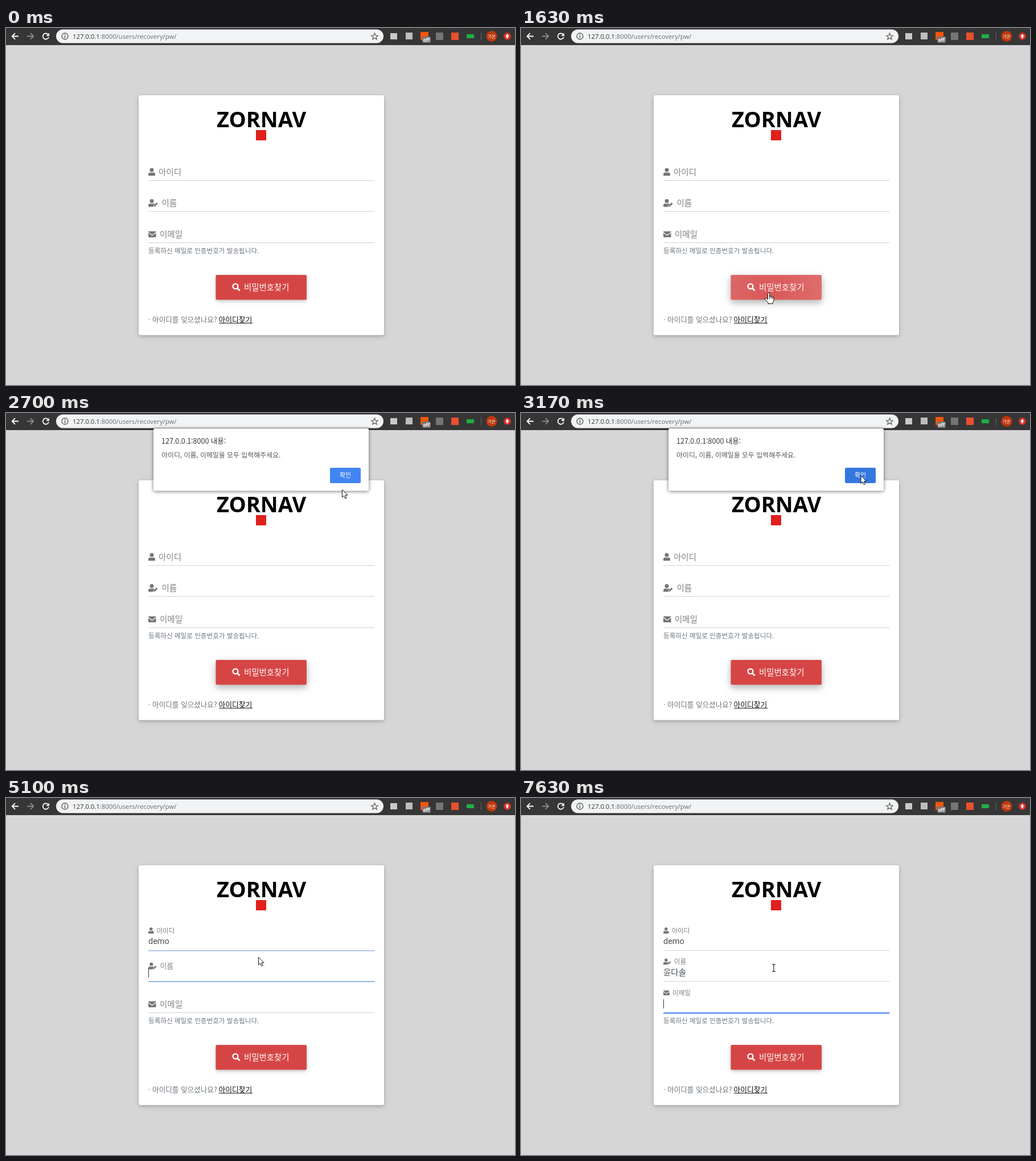
An HTML page that plays this animation: 894x626 px, repeating every 8 s.

```html
<!DOCTYPE html>
<html lang="ko">
<head>
<meta charset="utf-8">
<style>
  html, body { margin: 0; width: 100%; height: 100%; overflow: hidden; background: #d6d6d6; }
  svg { display: block; width: 894px; height: 626px; }
  text { font-family: "Noto Sans CJK KR", "Noto Sans CJK", "Noto Sans", sans-serif; white-space: pre; }
  .shadow { filter: drop-shadow(0 2px 2.5px rgba(0,0,0,.16)) drop-shadow(0 2px 5px rgba(0,0,0,.12)); }
  .latin { font-family: Roboto, "Noto Sans CJK KR", sans-serif; }
  .url { font-family: "Open Sans", "Noto Sans", sans-serif; }
  .word { font-family: "Noto Sans", "Open Sans", sans-serif; font-weight: 900; }
  .label text { font-size: 14.5px; font-weight: 300; fill: #808080; }
  .label { fill: #757575; }
  .value { fill: #495057; }
</style>
</head>
<body>
<svg viewBox="0 0 894 626">
  <defs>
    <clipPath id="btnClip"><rect x="368.5" y="433" width="159.5" height="43.5" rx="2"/></clipPath>
    <radialGradient id="wave">
      <stop offset="0" stop-color="#fff" stop-opacity=".1"/>
      <stop offset=".5" stop-color="#fff" stop-opacity=".19"/>
      <stop offset=".75" stop-color="#fff" stop-opacity=".25"/>
      <stop offset="1" stop-color="#fff" stop-opacity="0"/>
    </radialGradient>
    <path id="user" d="M6 0a3.4 3.4 0 0 1 0 6.9a3.4 3.4 0 0 1 0-6.9M3.4 7.7Q6 9 8.6 7.7Q12 8 12 11.2V12.6Q12 13.5 11 13.5H1Q0 13.5 0 12.6V11.2Q0 8 3.4 7.7Z"/>
  </defs>

  <rect width="894" height="626" fill="#d6d6d6"/>

  <!-- browser bar -->
  <rect width="894" height="30" fill="#363636"/>
  <g fill="none" stroke-width="1.8">
    <path d="M22 14.5H11M16 9.2L10.7 14.5L16 19.8" stroke="#fff"/>
    <path d="M37 14.5H48M43 9.2L48.3 14.5L43 19.8" stroke="#8b8b8b"/>
    <path d="M74 11.2A5.2 5.2 0 1 0 75 15.8" stroke="#fff"/>
  </g>
  <path d="M76 8.4V14H70.4Z" fill="#fff"/>
  <rect x="88" y="2.5" width="575" height="24" rx="12" fill="#f1f3f4"/>
  <circle cx="103.5" cy="14.5" r="5.5" fill="none" stroke="#555" stroke-width="1.3"/>
  <path d="M103.5 11V12.4M103.5 13.6V18" stroke="#555" stroke-width="1.4"/>
  <text x="117" y="18.5" font-size="11.3" class="url" fill="#333">127.0.0.1<tspan fill="#6a6d70">:8000/users/recovery/pw/</tspan></text>
  <path d="M647.5 9L649 13L653.3 13.2L650 15.9L651.1 20L647.5 17.7L643.9 20L645 15.9L641.7 13.2L646 13Z" fill="none" stroke="#555" stroke-width="1.2"/>
  <rect x="675" y="9" width="12" height="11" fill="#c9c9c9"/>
  <rect x="702" y="8" width="12" height="12" fill="#bdbdbd"/>
  <rect x="728" y="7" width="14" height="14" fill="#f4560c"/>
  <rect x="731" y="15" width="15" height="11" rx="2" fill="#777"/>
  <text x="738.5" y="24" font-size="9" font-weight="700" class="latin" text-anchor="middle" fill="#fff">off</text>
  <rect x="755" y="8" width="13" height="13" fill="#757575"/>
  <rect x="782" y="8" width="13" height="13" fill="#e9502f"/>
  <rect x="809" y="11" width="13" height="7" fill="#1fae45"/>
  <rect x="834" y="8" width="1" height="13" fill="#666"/>
  <circle cx="853" cy="14.5" r="9.5" fill="#bf360c"/>
  <text x="853" y="17.5" font-size="7.5" text-anchor="middle" fill="#fff">가온</text>
  <circle cx="880.5" cy="14.5" r="6.5" fill="#d93025"/>
  <path d="M880.5 10.5L884 14.5H882V18H879V14.5H877Z" fill="#fff"/>

  <!-- card -->
  <rect class="shadow" x="233" y="118" width="431" height="420.5" rx="3" fill="#fff"/>
  <text class="word" x="448.5" y="174" font-size="38" text-anchor="middle">ZORNAV</text>
  <rect x="439" y="179" width="18" height="18" fill="#e0201c"/>

  <g id="fields"></g>
  <text x="250" y="395" font-size="11.6" fill="#6c757d">등록하신 메일로 인증번호가 발송됩니다.</text>

  <rect id="btn" x="368.5" y="433" width="159.5" height="43.5" rx="2" fill="#d64545"/>
  <g clip-path="url(#btnClip)"><circle id="ripple" cx="435" cy="465" fill="url(#wave)"/></g>
  <g fill="none" stroke="#fff">
    <circle cx="403" cy="453" r="4.4" stroke-width="2.4"/>
    <path d="M406.5 456.5L410.5 460.5" stroke-width="2.8"/>
  </g>
  <text x="418" y="459.5" font-size="14.4" font-weight="500" fill="#fff">비밀번호찾기</text>

  <text x="250" y="515.5" font-size="12.6" fill="#6c757d">· 아이디를 잊으셨나요?</text>
  <text x="373.5" y="515.5" font-size="12.8" fill="#111">아이디찾기</text>
  <rect x="374" y="517" width="59" height="1" fill="#111"/>

  <g id="dialog">
    <rect x="259" y="27" width="378" height="109.5" rx="2" fill="#fff" style="filter:drop-shadow(0 1px 3px rgba(0,0,0,.55))"/>
    <text x="273" y="54" font-size="12.5" fill="#333">127.0.0.1:8000 내용:</text>
    <text x="273" y="78" font-size="11.9" fill="#555">아이디, 이름, 이메일을 모두 입력해주세요.</text>
    <rect id="ok" x="569" y="96" width="54" height="27" rx="2.5"/>
    <text x="596" y="113" font-size="11" text-anchor="middle" fill="#fff">확인</text>
  </g>

  <g id="cursor">
    <path id="arrow" d="M0 0V13.5L3.1 10.6L5.3 15.6L7.6 14.6L5.4 9.7H9.6Z" fill="#fff" stroke="#111"/>
    <path id="hand" d="M-1.5 9V1Q-1.5 -.5 0 -.5T1.5 1V6Q3 5 4.2 6.5Q6 5.7 7 7.2Q8.8 6.7 9 9V13Q8.5 16 7 17.5V19H-1V17Q-4 14 -6.5 10.5Q-7 8.5 -4.5 9L-1.5 11.5ZM1.5 6V10M4.2 6.5V10M7 7.2V10.5" fill="#fff" stroke="#111"/>
    <path id="beam" d="M-3 -6.5H-1L0 -5.5L1 -6.5H3M0 -5.5V5.5M-3 6.5H-1L0 5.5L1 6.5H3" fill="none" stroke="#222" stroke-width="1.2"/>
  </g>
</svg>

<script>
const $ = id => document.getElementById(id);
const LOOP = 8000;
const clamp = v => Math.max(0, Math.min(1, v));
const ease = (t, from, len) => 1 - (1 - clamp((t - from) / len)) ** 2;
const mix = (a, b, p) => a + (b - a) * p;
const blend = (a, b, p) => `rgb(${a.map((v, i) => Math.round(mix(v, b[i], p)))})`;

const GREY = [206, 209, 213], BLUE = [66, 133, 244];
const USER = '<use href="#user"/>';
const PEN = '<path d="M9 13.5L9.4 10.7L14.5 5.8L17 8.2L11.9 13.2Z" stroke="#fff" stroke-width=".8"/>';
const MAIL = '<path d="M0 3.2Q0 2 1.2 2H12.3Q13.5 2 13.5 3.2L6.75 8.3ZM0 4.7L6.75 9.7L13.5 4.7V11.3Q13.5 12.5 12.3 12.5H1.2Q0 12.5 0 11.3Z"/>';

// typed: [time, text, composing part]; carets: [on, off] spans
const fields = [
  { name: '아이디', icon: USER, textX: 18, y: 252, line: 267, focus: 3960, blur: 5010,
    typed: [[4430, 'd'], [4500, 'de'], [4570, 'dem'], [4630, 'demo']],
    carets: [[3830, 4970]] },
  { name: '이름', icon: USER + PEN, textX: 23.5, y: 306.5, line: 321, focus: 5010, blur: 6770,
    typed: [[5830, '', 'ㅇ'], [5900, '', '유'], [5970, '', '윤'], [6300, '윤', 'ㄷ'], [6370, '윤', '다'],
            [6430, '윤다', ''], [6630, '윤다', 'ㅅ'], [6700, '윤다', '소'], [6740, '윤다', '솔'], [6800, '윤다솔']],
    carets: [[4970, 5500], [5830, 6770]] },
  { name: '이메일', icon: MAIL, textX: 20, y: 361, line: 376, focus: 6770, blur: 9000,
    typed: [[7300, '', 'ㅅ'], [7630, '']],
    carets: [[6770, 7300], [7370, 8000]] }
];

for (const f of fields) {
  const g = document.createElementNS('http://www.w3.org/2000/svg', 'g');
  g.innerHTML = `<rect x="250" y="${f.line}" width="397.5" height="1"/>
    <g class="label">${f.icon}<text x="${f.textX}" y="12">${f.name}</text></g>
    <text class="value latin" x="250" y="${f.y + 4}" font-size="14.5"><tspan></tspan><tspan></tspan></text>
    <rect height="1" y="${f.y + 7}" fill="#495057"/>
    <rect width="1" height="16" y="${f.y - 8}" fill="#333"/>`;
  $('fields').append(g);
  [f.bar, f.label, f.value, f.under, f.caret] = g.children;
}

const last = (list, t) => list.filter(k => k[0] <= t).pop();

function drawField(f, t) {
  const up = ease(t, f.focus, 240);
  f.label.setAttribute('transform', `translate(250 ${f.y - 6.5 - 18.6 * up}) scale(${1 - .2 * up})`);
  const lit = ease(t, f.focus, 250) * (1 - ease(t, f.blur, 260));
  f.bar.setAttribute('fill', blend(GREY, BLUE, lit));
  f.bar.setAttribute('height', 1 + lit);

  const [, text = '', part = ''] = last(f.typed, t) || [];
  const [a, b] = f.value.children;
  a.textContent = text;
  b.textContent = part;
  const start = 250 + (text ? a.getComputedTextLength() : 0);
  const end = start + (part ? b.getComputedTextLength() : 0);
  f.under.setAttribute('x', start);
  f.under.setAttribute('width', end - start);
  f.caret.setAttribute('x', Math.round(end));
  f.caret.style.display = f.carets.some(([on, off]) => t >= on && t < off) ? '' : 'none';
}

// pointer stops: time, x, y, shape
const stops = [
  [430, 880, 640, 'arrow'], [500, 842, 612, 'arrow'], [700, 600, 560, 'arrow'], [870, 332, 520, 'arrow'],
  [1000, 370, 500, 'arrow'], [1170, 435, 464.5, 'hand'], [1830, 435, 464.5, 'arrow'],
  [2170, 526, 436, 'arrow'], [2450, 565, 270, 'arrow'], [2700, 590.5, 134.5, 'arrow'],
  [3030, 597, 110, 'arrow'], [3200, 597, 110, 'arrow'], [3630, 440, 378, 'arrow'],
  [3770, 440, 378, 'arrow'], [3880, 411, 240, 'beam'], [4970, 411, 240, 'beam'],
  [5030, 432, 262, 'arrow'], [5100, 443.5, 279, 'arrow'], [5230, 444, 298, 'beam'], [8000, 444, 298, 'beam']
];

function drawCursor(t) {
  const i = Math.max(1, stops.findIndex(s => s[0] > t));
  const a = stops[i - 1], b = stops[i];
  const p = clamp((t - a[0]) / (b[0] - a[0]));
  $('cursor').setAttribute('transform', `translate(${mix(a[1], b[1], p)} ${mix(a[2], b[2], p)})`);
  for (const shape of ['arrow', 'hand', 'beam']) $(shape).style.display = shape === a[3] ? '' : 'none';
}

function draw(t) {
  fields.forEach(f => drawField(f, t));

  const hover = ease(t, 1370, 200) * (1 - ease(t, 3300, 250));
  const shadow = (y, blur, alpha) => `drop-shadow(0 ${y}px ${blur}px rgba(0,0,0,${alpha}))`;
  $('btn').style.filter = shadow(2 + 3 * hover, 2.5 + 3 * hover, .16 + .02 * hover)
    + shadow(2 + 2 * hover, 5 + 2.5 * hover, .12 + .03 * hover);
  $('ripple').setAttribute('r', 190 * ease(t, 1430, 350));
  $('ripple').setAttribute('opacity', 1 - clamp((t - 1700) / 400));

  $('dialog').style.display = t >= 1830 && t < 3230 ? '' : 'none';
  $('ok').setAttribute('fill', t >= 2900 ? '#3577e0' : '#4285f4');
  drawCursor(t);
}

function tick(now) {
  draw(now % LOOP);
  requestAnimationFrame(tick);
}
draw(0);
requestAnimationFrame(tick);
</script>
</body>
</html>
```
